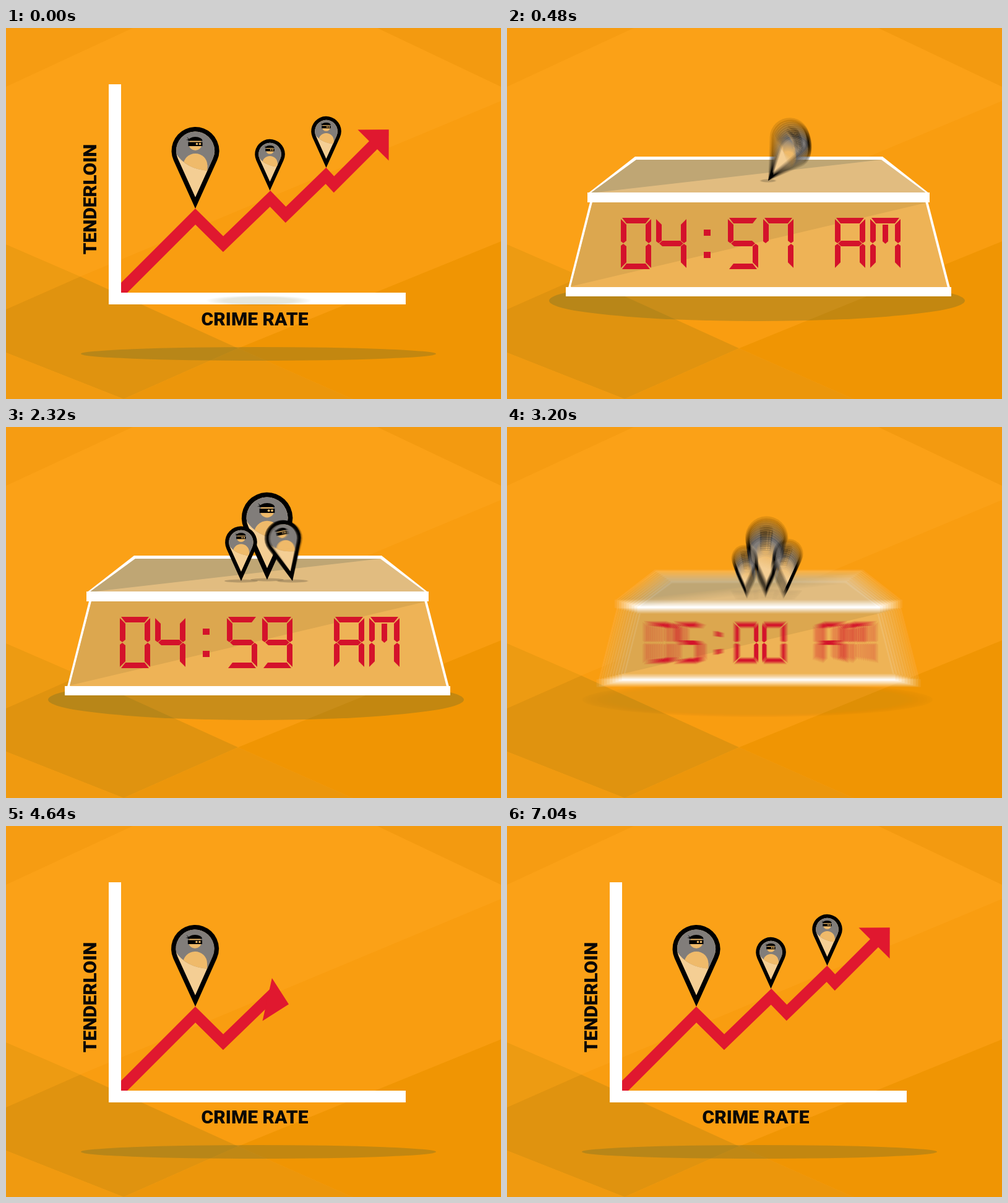
These frames come from a looping animation (800x600 px, 7.12 s). An HTML page with a canvas:

```html
<!DOCTYPE html>
<html lang="en">
<head>
<meta charset="utf-8">
<title>Crime rate</title>
<style>
html, body { margin: 0; width: 100%; height: 100%; overflow: hidden; background: #fba117; }
canvas { display: block; }
</style>
</head>
<body>
<canvas id="stage" width="800" height="600"></canvas>
<script>
const LOOP = 7120, STEP = 80, SHUTTER = 40, SAMPLES = 10;
const BEAT = 855, CLOCK_START = 355, CHART_START = 3875;
const RED = '#e0182f', DIGIT = '#d4122b', SHADOW = 'rgba(100,105,45,.32)';
const stage = document.getElementById('stage').getContext('2d');
const buffer = document.createElement('canvas');
buffer.width = 800;
buffer.height = 600;
const ctx = buffer.getContext('2d');

const clamp = x => Math.max(0, Math.min(1, x));
const progress = (t, start, length) => clamp((t - start) / length);
const easeOut = x => 1 - (1 - x) ** 2;
const easeInOut = x => x < .5 ? 4 * x ** 3 : 1 - 4 * (1 - x) ** 3;

function poly(color, ...points) {
  ctx.beginPath();
  points.forEach(([x, y]) => ctx.lineTo(x, y));
  ctx.closePath();
  ctx.fillStyle = color;
  ctx.fill();
}

function rect(color, x, y, w, h) {
  ctx.fillStyle = color;
  ctx.fillRect(x, y, w, h);
}

function ellipse(color, x, y, rx, ry) {
  ctx.beginPath();
  ctx.ellipse(x, y, rx, ry, 0, 0, 7);
  ctx.fillStyle = color;
  ctx.fill();
}

function placed(x, y, scale, angle, draw) {
  if (scale <= 0) return;
  ctx.save();
  ctx.translate(x, y);
  ctx.rotate(angle);
  ctx.scale(scale, scale);
  draw();
  ctx.restore();
}

const zoomed = (x, y, scale, draw) => placed(x, y, scale, 0, () => {
  ctx.translate(-x, -y);
  draw();
});

function background() {
  const left = [120, 402], low = [375, 518];
  rect('#fba117', 0, 0, 800, 600);
  poly('#f69c12', [0, 0], [205, 0], [0, 95]);
  poly('#f39a10', [600, 0], [800, 0], [800, 95]);
  poly('#f99d10', left, [800, 118], [800, 345], low);
  poly('#ed9b12', [0, 350], left, [0, 455]);
  poly('#e0930f', left, low, [190, 600], [0, 525], [0, 455]);
  poly('#f09503', low, [800, 345], [800, 600], [560, 600]);
  poly('#ec960b', low, [560, 600], [190, 600]);
  poly('#f09a10', [0, 525], [190, 600], [0, 600]);
}

// Outline of a map pin whose outer tip is at the origin.
function drop(radius, tip) {
  const cy = -93.5, a = Math.asin(radius / (tip - cy));
  ctx.beginPath();
  ctx.moveTo(0, tip);
  ctx.arc(0, cy, radius, Math.PI - a, a);
  ctx.closePath();
}

function pinArt(border) {
  const tan = '#efba6a';
  drop(38.5, 0);
  ctx.fillStyle = '#000';
  ctx.fill();
  ctx.save();
  drop(38.5 - border, -border * 93.5 / 38.5);
  ctx.clip();
  rect('#f4ce94', -40, -140, 80, 140);
  ctx.beginPath();
  ctx.moveTo(-40, -140);
  ctx.lineTo(40, -140);
  ctx.lineTo(40, -61);
  ctx.lineTo(21, -61);
  ctx.quadraticCurveTo(-16, -64, -32, -90);
  ctx.clip();
  rect('#817d7a', -40, -140, 80, 90);
  ellipse(tan, 0, -70, 19.5, 19);
  rect(tan, -19.5, -70, 39, 20);
  ctx.restore();
  ellipse(tan, 0, -104, 10.5, 10);
  ctx.beginPath();
  ctx.ellipse(0, -109.5, 11.5, 6.5, 0, Math.PI, 0);
  ctx.fillStyle = '#000';
  ctx.fill();
  poly('#000', [-7, -110], [-14, -116], [-11, -112], [-15, -111]);
  rect('#000', -11.5, -107.5, 23, 6.5);
  ellipse(tan, 2.5, -104.5, 1.8, 1.8);
  ellipse(tan, 7.5, -104.5, 1.8, 1.8);
}

// A pin grows out of its tip and swings to rest.
function pin(t, start, x, y, size) {
  const age = Math.max(0, t - start);
  const swing = 86 * Math.exp(-0.0065 * age) * Math.sin(age * Math.PI / 200);
  placed(x, y, size * easeOut(clamp(age / 270)), swing * Math.PI / 180,
    () => pinArt(7.5 / Math.sqrt(size)));
}

// Seven-segment characters, plus a short centre bar (m) for the letter M.
const W = 49, H = 83;
const bar = [[2, 0], [47, 0], [40, 9], [9, 9]];
const side = [[0, 2], [9, 11], [9, 37], [4, 41], [0, 38]];
const flipX = points => points.map(([x, y]) => [W - x, y]);
const flipY = points => points.map(([x, y]) => [x, H - y]);
const segments = {
  a: bar, d: flipY(bar),
  f: side, b: flipX(side), e: flipY(side), c: flipX(flipY(side)),
  g: [[5, 41.5], [10, 37], [39, 37], [44, 41.5], [39, 46], [10, 46]],
  m: [[20, 11], [29, 11], [29, 38], [24.5, 42], [20, 38]]
};
const glyphs = {
  0: 'abcdef', 4: 'bcfg', 5: 'acdfg', 7: 'abcf', 8: 'abcdefg', 9: 'abcdfg',
  A: 'abcefg', M: 'abcefm'
};

function display(text) {
  [...text].forEach((char, i) => {
    const x = 184 + 57 * (i % 2) + 173 * (i >> 1);
    placed(x, 307, 1, 0, () => {
      for (const name of glyphs[char]) poly(DIGIT, ...segments[name]);
    });
  });
  rect(DIGIT, 318, 326, 11, 10);
  rect(DIGIT, 318, 362, 11, 10);
}

function timeText(t) {
  const beats = Math.floor((t - CLOCK_START) / BEAT + .1);
  const minutes = 4 * 60 + 57 + Math.max(0, Math.min(3, beats));
  return '0' + Math.floor(minutes / 60) + String(minutes % 60).padStart(2, '0') + 'AM';
}

const clockPins = [[422, 247, 1.07], [380, 249, .67], [463, 249, .76]];

function clock(t) {
  poly('#fff', [207, 208], [607, 208], [683, 268], [130, 268]);
  poly('#e1bc80', [209, 213], [605, 213], [678, 267], [135, 267]);
  poly('#bfa674', [209, 213], [605, 213], [135, 267]);
  poly('#fff', [134.5, 280], [680, 280], [716, 420], [99, 420]);
  poly('#eeb356', [138.5, 280], [676, 280], [712, 420], [103, 420]);
  poly('#dca74f', [138.5, 280], [676, 280], [676, 283], [103, 418]);
  rect('#fff', 130, 266, 553, 16);
  rect('#fff', 95, 419, 623, 15);
  display(timeText(t));
  clockPins.forEach(([x, y, size], i) => {
    const start = CLOCK_START + i * BEAT;
    ellipse('rgba(80,70,50,.3)', x, y, 27 * progress(t, start, 280), 2.5);
    pin(t, start, x, y, size);
  });
}

const route = [[180, 431], [306, 305], [351, 349.5], [427, 276], [452, 302], [517, 239], [530, 253], [602, 181]];
const reach = [0];
for (let i = 1; i < route.length; i++) {
  reach[i] = reach[i - 1] + Math.hypot(route[i][0] - route[i - 1][0], route[i][1] - route[i - 1][1]);
}
const total = reach.at(-1);

// Points of the route from its start up to a distance.
function routeTo(distance) {
  const d = Math.max(0, Math.min(total, distance));
  const next = Math.max(1, reach.findIndex(r => r >= d));
  const [ax, ay] = route[next - 1], [bx, by] = route[next];
  const f = (d - reach[next - 1]) / (reach[next] - reach[next - 1]);
  return [...route.slice(0, next), [ax + (bx - ax) * f, ay + (by - ay) * f]];
}

// The arrow hesitates just past each peak, where a pin drops in.
const stops = [0, reach[1] + 10, reach[3] + 10, reach[5] + 10, total];

function arrowDistance(t) {
  let distance = 0;
  for (let i = 1; i < stops.length; i++) {
    const end = CHART_START - 95 + (i - 1) * BEAT;
    const start = Math.max(3400, end - BEAT);
    distance += (stops[i] - stops[i - 1]) * easeInOut(progress(t, start, end - start));
  }
  return distance;
}

function trend(t) {
  const distance = arrowDistance(t);
  const line = routeTo(distance), [x, y] = line.at(-1);
  ctx.beginPath();
  line.forEach(p => ctx.lineTo(...p));
  ctx.strokeStyle = RED;
  ctx.lineWidth = 18.4;
  ctx.stroke();
  const [ax, ay] = routeTo(distance - 30).at(-1), [bx, by] = routeTo(distance + 30).at(-1);
  placed(x, y, clamp(distance / 40), Math.atan2(by - ay, bx - ax),
    () => poly(RED, [-12, -35.4], [23.6, 0], [-12, 35.4]));
}

const chartPins = [[306, 292, 1], [426.5, 263, .63], [517.5, 226, .63]];

function chart(t) {
  ellipse(SHADOW, 408, 527, 287, 11);
  trend(t);
  rect('#fff', 166, 91, 20, 356);
  rect('#fff', 166, 428, 480, 19);
  ctx.fillStyle = '#0a0806';
  ctx.font = '900 30px Roboto, sans-serif';
  ctx.textAlign = 'center';
  ctx.fillText('CRIME RATE', 402, 480.5);
  placed(146, 277, 1, -Math.PI / 2, () => ctx.fillText('TENDERLOIN', 0, 0));
  chartPins.forEach((p, i) => pin(t, CHART_START + i * BEAT, ...p));
}

function scene(t) {
  background();
  if (t < 1000) {
    zoomed(407, 350, 1 - progress(t, 30, 200) ** 2, () => chart(LOOP));
  } else {
    zoomed(407, 350, easeOut(progress(t, 3280, 200)), () => chart(t));
  }
  const exit = 1 - progress(t, 3080, 256) ** 2;
  const shadow = progress(t, -90, 430);
  ctx.globalAlpha = Math.sqrt(shadow) * exit ** 5;
  zoomed(410, 441, shadow * exit, () => ellipse(SHADOW, 404, 441, 336, 33));
  ctx.globalAlpha = 1;
  zoomed(407, 350, exit * easeOut(progress(t, 150, 250)), () => clock(t));
}

// Average several moments around t to get motion blur.
function render(t) {
  for (let i = 0; i < SAMPLES; i++) {
    scene(t + ((i + .5) / SAMPLES - .5) * SHUTTER);
    stage.globalAlpha = 1 / (i + 1);
    stage.drawImage(buffer, 0, 0);
  }
}

let shown = -1;
function tick() {
  const t = Math.floor(performance.now() % LOOP / STEP) * STEP;
  if (t !== shown) render(shown = t);
  requestAnimationFrame(tick);
}
tick();
</script>
</body>
</html>
```
